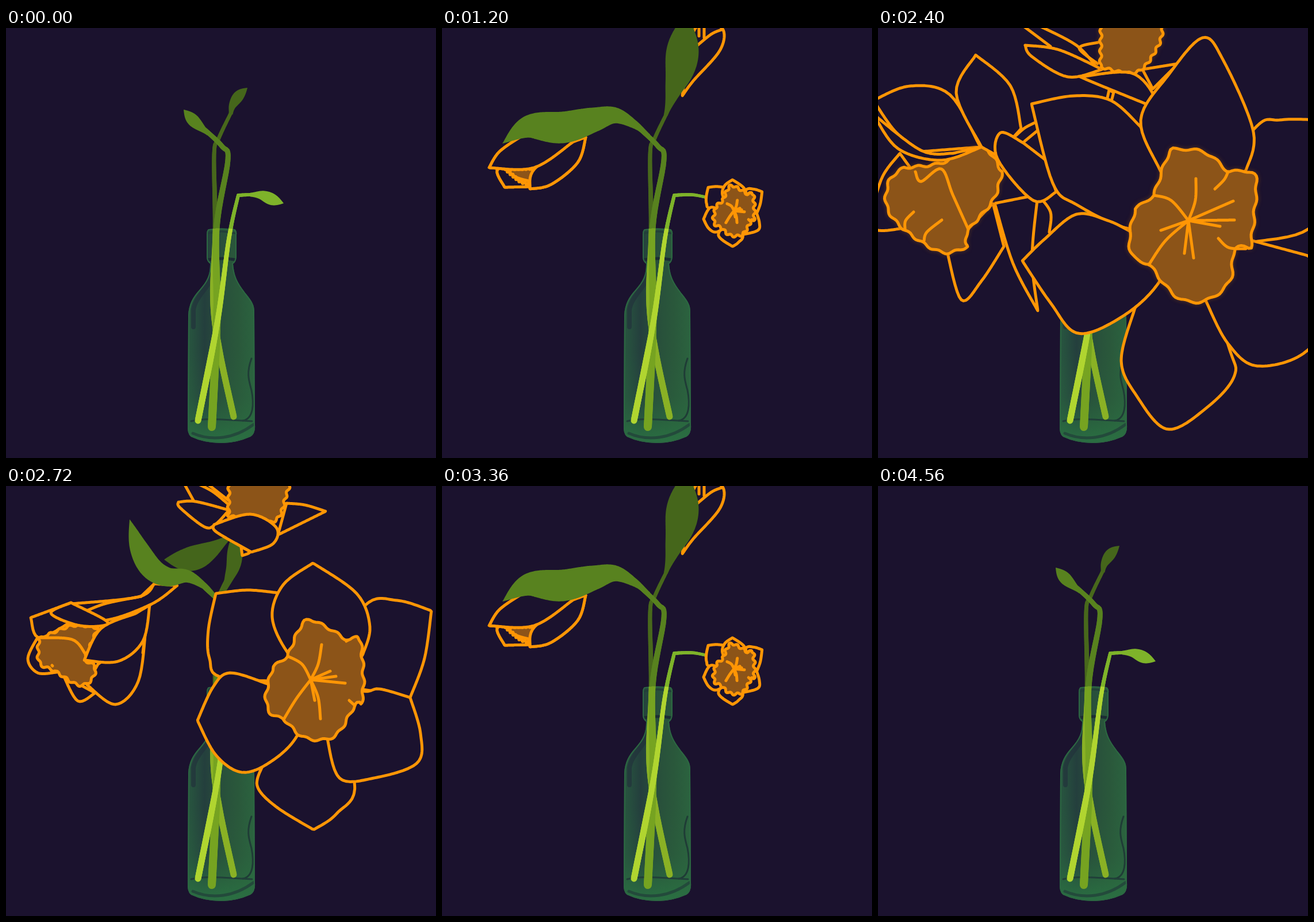
An HTML page with a canvas that plays this animation: 748x748 px, repeating every 4640 ms.

```html
<!DOCTYPE html>
<html lang="en">
<head>
<meta charset="utf-8">
<title>Flowers in a bottle</title>
<style>
html, body { margin: 0; width: 100%; height: 100%; overflow: hidden; background: #1b122e; }
canvas { display: block; width: 100vw; height: 100vh; }
</style>
</head>
<body>
<canvas id="stage" width="748" height="748"></canvas>
<script>
const ctx = document.getElementById('stage').getContext('2d');
const BG = '#1b122e', LINE = '#ff9605', BROWN = '#8c5418';
const STEP = 80, COUNT = 58, SAMPLES = 180;
const BUD = 15, HALF = 23, FULL = 27;

const mix = (a, b, t) => a + (b - a) * t;
const mixPoint = (p, q, t) => [mix(p[0], q[0], t), mix(p[1], q[1], t)];

function hermite(a, b, c, d, t) {
  const t2 = t * t, t3 = t2 * t;
  return b + 0.5 * ((c - a) * t + (2 * a - 5 * b + 4 * c - d) * t2 + (3 * (b - c) + d - a) * t3);
}

// "x y x y | x y": smooth runs, with a corner at each bar
function spline(text) {
  const out = [];
  let last;
  for (const run of text.split('|')) {
    const n = run.trim().split(/\s+/).map(Number), p = last ? [last] : [];
    for (let i = 0; i + 1 < n.length; i += 2) p.push([n[i], n[i + 1]]);
    for (let i = 0; i + 1 < p.length; i++) {
      const b = p[i], c = p[i + 1], a = p[i - 1] || b, d = p[i + 2] || c;
      for (let t = 0; t < 1; t += 0.125) {
        out.push([hermite(a[0], b[0], c[0], d[0], t), hermite(a[1], b[1], c[1], d[1], t)]);
      }
    }
    last = p[p.length - 1];
  }
  out.push(last);
  return out;
}

// Evenly spaced points along the curve
function sample(text, closed) {
  if (closed) text += ' ' + text.trim().split(/\s+/).slice(0, 2).join(' ');
  const p = spline(text), len = [0];
  for (let i = 1; i < p.length; i++) {
    len[i] = len[i - 1] + Math.hypot(p[i][0] - p[i - 1][0], p[i][1] - p[i - 1][1]);
  }
  const out = [];
  for (let s = 0, j = 0; s <= SAMPLES; s++) {
    const d = len[len.length - 1] * s / SAMPLES;
    while (j < p.length - 2 && len[j + 1] < d) j++;
    out.push(mixPoint(p[j], p[j + 1], (d - len[j]) / (len[j + 1] - len[j] || 1)));
  }
  return out;
}

// Neighbouring keys and the blend between them; the last span runs on past its end
function span(times, k) {
  let i = 0;
  while (i < times.length - 2 && k >= times[i + 1]) i++;
  let t = Math.max(0, (k - times[i]) / (times[i + 1] - times[i]));
  if (times[i] === 7) t = 1 - Math.pow(Math.max(0, 1 - t), 1.4);
  return [i, t];
}

function pose(times, poses, k) {
  const [i, t] = span(times, k);
  return poses[i].map((p, n) => mixPoint(p, poses[i + 1][n], t));
}

function trace(pts) {
  ctx.beginPath();
  pts.forEach(p => ctx.lineTo(p[0], p[1]));
}

// Flowers: each part opens from bud to half to full bloom.
// A bud is its own curve, or a function that moves the half-open points.
function part(kind, bud, half, full) {
  const closed = kind !== 'line', mid = sample(half, closed);
  const start = typeof bud === 'string' ? sample(bud, closed) : mid.map(bud);
  return { kind, poses: [start, mid, sample(full, closed)] };
}

const shrink = (s, [x0, y0], [x1, y1]) => ([x, y]) => [x1 + s * (x - x0), y1 + s * (y - y0)];
const lift = ([x, y]) => [x, y - 160];

const budFront = '140 187 100 215 82 243 | 160 243 228 198 | 190 180 |';
const budBack = '250 190 236 234 190 272 153 280 | 161 245 228 198 |';
const budInner = '152 276 109 277 | 98 245 161 245 |';
const under = '200 180 210 180';

const leftFlower = [
  part('petal', budInner, '88 324 55 325 38 300 57 260 | 90 290 |', '47 348 -10 346 5 265 38 218 | 90 290 |'),
  part('petal', budInner, '155 360 125 374 100 330 |', '219 380 180 440 145 473 120 388 | 200 305 |'),
  part('petal', budBack, '243 250 230 340 190 380 140 345 | 160 310 |', '278 290 268 400 278 492 | 235 410 203 305 |'),
  part('line', under, '243 250 238 290', '278 290 300 320 298 355'),
  part('petal', budFront, '113 203 43 229 | 60 264 135 222 |', '178 207 125 116 55 101 -8 126 | 30 180 75 215 |'),
  part('crown', '161 244 110 245 | 135 266 152 272 |',
    '160 247 115 243 57 266 | 58 307 85 322 125 346 148 338 155 315 136 303 |',
    '216 250 180 207 110 235 45 243 | 20 265 15 310 45 350 110 390 157 380 | 155 355 200 300'),
  part('line', '112 247 130 260 155 267', '57 264 115 267 138 292', '65 250 75 267 110 245 130 290 157 350'),
  part('line', '152 272 152 273', '80 312 81 313', '47 350 48 335 62 320'),
  part('line', '152 272 152 273', '85 322 86 323', '80 370 85 355 111 334'),
  part('petal', '250 185 190 180 | 220 180', '258 170 230 193 113 205 | 165 234 250 207 298 173 |',
    '249 175 230 100 170 47 | 136 113 180 207 | 207 222 |'),
  part('line', under, '140 217 175 204 235 192', '240 187 255 174 272 165'),
  part('line', under, '235 192 258 170', '255 197 278 178'),
  part('petal', budBack, '250 207 238 270 195 305 136 303 | 165 248 225 222 |', '292 230 310 285 | 270 300 208 228 213 182 253 200 |'),
  part('petal', budFront, '113 203 78 221 120 241 160 244 175 235', '130 218 75 213 -8 150 | 35 210 110 230 180 207 |')
];

const topFlower = [
  part('line', lift, '310 -4 326 25', '252 -4 300 32'),
  part('line', lift, '333 -4 360 10 388 33', '280 -4 345 30 380 68'),
  part('line', lift, '350 -4 387 25', '383 25 350 35 382 62'),
  part('petal', lift, '300 28 330 27 388 42 | 364 67 345 71 303 38', '256 30 315 38 390 72 | 330 85 268 50'),
  part('petal', lift, '488 30 520 33 556 44 | 473 85 |', '460 72 522 62 | 478 106 |'),
  part('crown', lift, '388 -8 387 52 | 465 62 488 15 494 -8 |', '388 -8 387 68 | 450 77 488 30 496 -8 |'),
  part('petal', lift, '409 106 424 115 411 121 |', '402 108 410 112 | 403 135 396 135 |'),
  part('petal', '430 30 446 -5 487 0 484 38 437 92 418 118 |',
    '362 67 425 49 470 72 465 100 427 115 | 366 80', '352 85 440 78 480 118 466 132 | 380 97')
];
const topBud = ['447 -6 447 14', '456 -6 456 17', '441 33 468 11 486 3'].map(s => sample(s));

const budPetal = shrink(0.25, [537, 366], [506, 322]);
const budCrown = shrink(0.42, [537, 337], [508, 318]);
const budHeart = shrink(0.3, [530, 337], [508, 318]);
const petal = (half, full) => part('petal', budPetal, `540 340 | ${half} |`, `540 340 | ${full} |`);
const stamen = (half, full) => part('line', budHeart, `530 337 ${half}`, `540 335 ${full}`);

const bigFlower = [
  petal('622 210 680 199 740 217 | 728 300 703 368', '652 178 700 160 770 160 | 800 270 748 350 655 372'),
  petal('606 513 575 570 535 598 | 470 558 437 522 447 485', '608 548 620 605 570 662 503 698 450 640 423 578 447 487'),
  petal('380 334 354 300 352 250 365 187 | 420 181 474 186', '441 350 345 307 304 270 267 132 | 340 118 405 126 457 172'),
  petal('490 290 463 228 482 172 534 134 | 610 187 633 245 620 295', '492 250 457 160 505 82 564 17 600 55 653 180 640 248'),
  petal('620 357 650 353 703 368 | 721 430 715 482 640 508 580 508 558 435', '655 371 748 396 | 800 460 748 560 660 588 608 548 570 474'),
  petal('508 432 460 480 410 498 365 468 333 408 | 360 350 390 325 457 345', '487 445 420 505 347 531 300 478 251 405 | 290 367 345 324 400 335 441 355'),
  part('crown', budCrown,
    '490 296 520 235 560 247 595 268 615 265 622 340 618 380 | 607 382 572 435 520 438 483 405 | 460 395 452 365 464 315 |',
    '480 291 505 220 522 211 570 217 609 250 | 655 255 655 320 648 383 | 620 385 612 440 570 474 520 468 471 410 | 446 400 437 368 447 315 |'),
  stamen('515 310 490 296', '510 300 480 291'),
  stamen('505 370 483 406', '500 370 471 412'),
  stamen('543 310 549 276', '552 300 553 262'),
  stamen('590 343', '595 345'),
  stamen('564 322', '618 301'),
  stamen('574 331', '620 334'),
  stamen('543 368 547 405', '549 400'),
  stamen('537 373', '533 392'),
  stamen('529 340', '492 352'),
  part('line', budCrown, '595 268 592 270', '609 250 602 264 586 280'),
  part('line', budCrown, '607 382 597 373', '640 384 610 382 592 366')
];

function ruffle(pts) {
  return pts.map(([x, y], n) => {
    const a = pts[Math.max(0, n - 1)], b = pts[Math.min(SAMPLES, n + 1)];
    const d = Math.hypot(b[0] - a[0], b[1] - a[1]) || 1, w = 2 * Math.sin(n * Math.PI * 2 / 9);
    return [x + w * (b[1] - a[1]) / d, y - w * (b[0] - a[0]) / d];
  });
}

function drawFlower(parts, k, x, y, extra = []) {
  if (k < 9) return;
  const s = Math.min(1, 0.5 + 0.1 * (k - 10));
  ctx.save();
  ctx.translate(x * (1 - s), y * (1 - s));
  ctx.scale(s, s);
  ctx.strokeStyle = LINE;
  ctx.lineWidth = 5;
  for (const { kind, poses } of parts) {
    const pts = pose([BUD, HALF, FULL], poses, k), crown = kind === 'crown';
    trace(crown ? ruffle(pts) : pts);
    if (kind !== 'line') {
      ctx.closePath();
      ctx.fillStyle = crown ? BROWN : BG;
      ctx.shadowColor = BROWN;
      ctx.shadowBlur = crown ? Math.max(0, 2.5 * (k - HALF)) : 0;
      ctx.fill();
      ctx.shadowBlur = 0;
    }
    ctx.stroke();
  }
  extra.forEach(p => { trace(p); ctx.stroke(); });
  ctx.restore();
}

// Leaves: a spine that swells past its middle, [spine, half width] per key
function leaf(color, keys) {
  const list = Object.values(keys);
  return { color, times: Object.keys(keys).map(Number), poses: list.map(l => sample(l[0])), widths: list.map(l => l[1]) };
}

const leftLeaf = leaf('#58821f', {
  0: ['352 184 328 163 309 142', 9],
  7: ['352 184 320 152 294 126', 13],
  15: ['360 188 335 168 300 152 262 160 210 173 150 172 105 201', 26],
  23: ['362 190 345 174 315 157 280 158 252 142 230 105 215 58', 18],
  27: ['362 190 345 176 330 168', 5]
});
const topLeaf = leaf('#45661b', {
  0: ['391 150 394 135 405 118 420 104', 8],
  7: ['390 150 402 120 408 85 421 50', 17],
  15: ['389 152 402 110 416 60 424 -25', 27],
  23: ['377 187 388 160 397 130 399 75', 12],
  27: ['380 185 388 160', 3]
});
const sideLeaf = leaf('#44651b', {
  15: ['388 155 390 150', 0],
  23: ['392 86 355 112 320 127 275 128', 20],
  27: ['385 150 360 165', 5]
});
const rightBud = leaf('#7eb32a', {
  0: ['425 290 445 291 465 299 483 305', 9],
  7: ['425 290 455 291 485 302 512 314', 15],
  12: ['425 290 445 291 470 299', 4]
});

function drawLeaf({ color, times, poses, widths }, k) {
  const [i, t] = span(times, k), spine = pose(times, poses, k);
  const width = Math.max(0, mix(widths[i], widths[i + 1], t)), left = [], right = [];
  spine.forEach(([x, y], n) => {
    const u = n / SAMPLES, a = spine[Math.max(0, n - 2)], b = spine[Math.min(SAMPLES, n + 2)];
    const d = Math.hypot(b[0] - a[0], b[1] - a[1]) || 1;
    const w = width * Math.sin(Math.PI * Math.pow(u, 1.4)) + 3.5 * (1 - u);
    left.push([x - w * (b[1] - a[1]) / d, y + w * (b[0] - a[0]) / d]);
    right.unshift([x + w * (b[1] - a[1]) / d, y - w * (b[0] - a[0]) / d]);
  });
  trace(left.concat(right));
  ctx.fillStyle = color;
  ctx.fill();
}

// Spine, widths at both ends, colour outside and inside the glass
const stems = [
  ['392 146 370 192 362 220 364 350 360 470 371 560 396 676', 6, 11, '#48681c', '#8ab125'],
  ['346 177 376 206 386 230 366 350 367 500 358 694', 8, 14, '#58821f', '#76a321'],
  ['462 295 435 290 404 291 | 388 365 368 510 334 683', 5, 11, '#7eb32a', '#b0d530']
].map(([s, ...style]) => [sample(s), ...style]);

function drawStem([pts, w0, w1, outside, inside], inGlass) {
  ctx.strokeStyle = inGlass ? inside : outside;
  for (let i = 1; i < pts.length; i++) {
    ctx.lineWidth = mix(w0, w1, Math.min(1, 1.3 * i / SAMPLES));
    trace(pts.slice(i - 1, i + 1));
    ctx.stroke();
  }
}

const glass = new Path2D('M352 350Q375 347 398 350Q402 353 401 360V398Q400 408 395 410C397 435 405 446 418 463C429 477 432 482 432 495L433 690Q434 706 425 711Q400 722 375 722Q345 722 322 711Q315 706 316 690L317 500C318 480 325 468 336 456C350 440 355 430 355 410Q349 406 349 398V360Q349 352 352 350Z');

function gradient(x0, y0, x1, y1, ...colors) {
  const g = ctx.createLinearGradient(x0, y0, x1, y1);
  colors.forEach((c, i) => g.addColorStop(i / (colors.length - 1), c));
  return g;
}

function strokePath(d, color, width) {
  ctx.strokeStyle = color;
  ctx.lineWidth = width;
  ctx.stroke(new Path2D(d));
}

function drawBottle() {
  ctx.save();
  ctx.clip(glass);
  ctx.fillStyle = gradient(316, 0, 433, 0, '#28573f', '#243f3d', '#284f3b', '#2a583b', '#2b633f');
  ctx.fillRect(310, 340, 130, 390);
  ctx.fillStyle = gradient(0, 560, 0, 722, '#2a683f00', '#2a683f30', '#2a7042');
  ctx.fillRect(310, 560, 130, 170);
  strokePath('M360 425C356 450 330 465 326 490V520', '#21303baa', 8);
  strokePath('M427 575C418 600 422 612 427 630C432 655 430 680 412 683', '#1f3c36', 3);
  strokePath('M322 684Q340 679 375 681T428 684', '#213f39', 3);
  strokePath('M325 705Q350 716 378 712T430 690', '#234a3b', 5);
  strokePath('M352 357Q375 351 398 357', '#223f39', 3);
  strokePath('M351 403Q375 399 399 403', '#1c2c34', 5);
  ctx.strokeStyle = '#2c6842';
  ctx.lineWidth = 4;
  ctx.stroke(glass);
  stems.forEach(s => drawStem(s, true));
  ctx.restore();
}

function draw(k) {
  ctx.fillStyle = BG;
  ctx.fillRect(0, 0, 748, 748);
  ctx.lineCap = ctx.lineJoin = 'round';
  stems.forEach(s => drawStem(s, false));
  drawBottle();
  drawFlower(leftFlower, k, 245, 180);

  const top = [
    () => drawFlower(topFlower, k, 430, 100, k < 18 ? topBud : []),
    () => { if (k > BUD) drawLeaf(sideLeaf, k); drawLeaf(topLeaf, k); }
  ];
  if (k > 18) top.reverse();
  top.forEach(f => f());

  drawLeaf(leftLeaf, k);
  if (k < 13) drawLeaf(rightBud, k);
  drawFlower(bigFlower, k, 460, 296);
}

let shown = -1;
function tick(now) {
  const i = Math.floor(now / STEP) % COUNT, k = Math.min(i, COUNT - 1 - i);
  if (k !== shown) draw(shown = k);
  requestAnimationFrame(tick);
}
draw(0);
requestAnimationFrame(tick);
</script>
</body>
</html>
```
